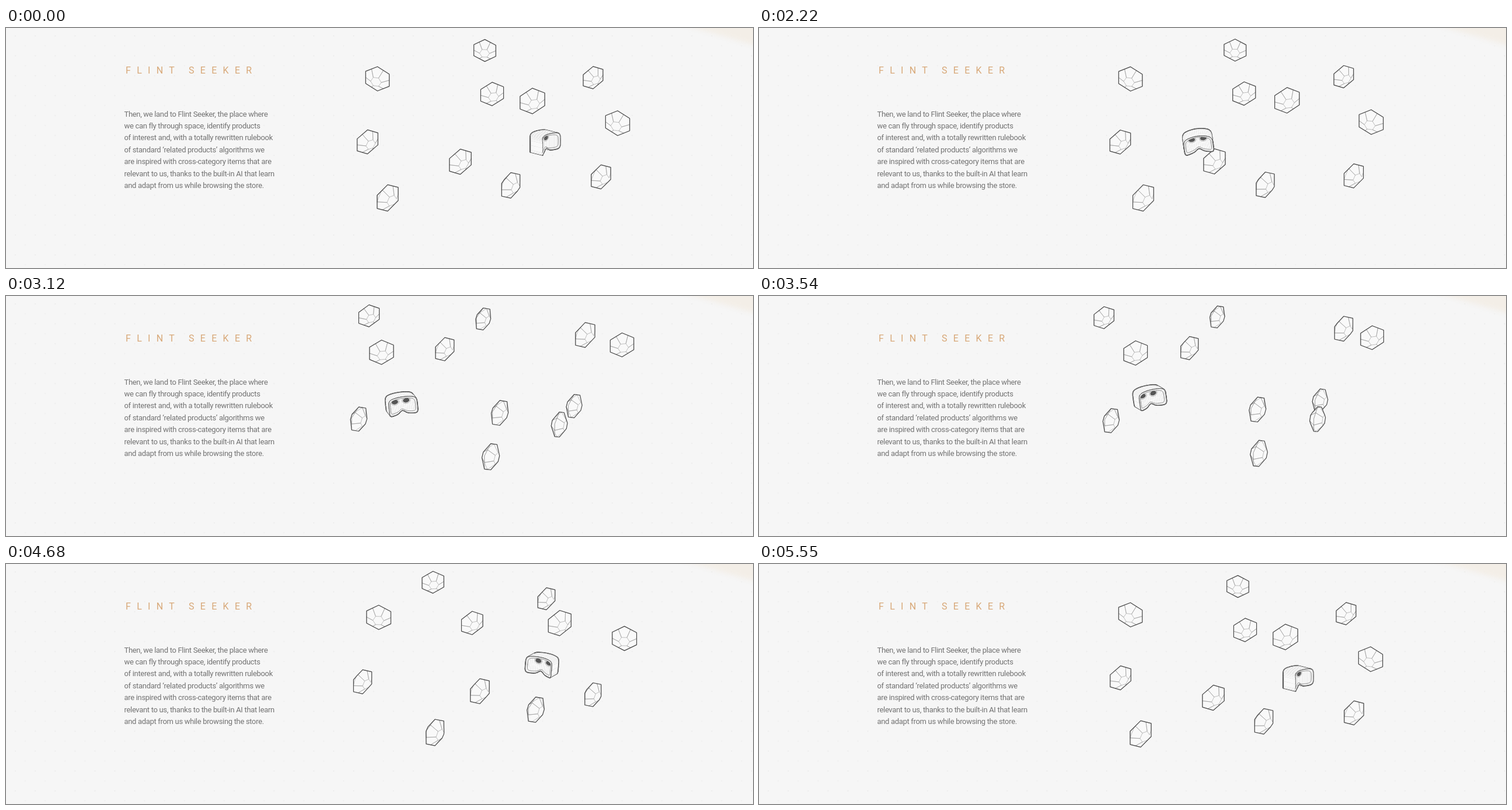
These frames come from a looping animation (1280x411 px, 5580 ms). An HTML page with a canvas:

```html
<!DOCTYPE html>
<html lang="en">
<head>
<meta charset="utf-8">
<title>Flint Seeker</title>
<style>
html, body { margin: 0; width: 100%; height: 100%; overflow: hidden; background: #f6f6f6; }
body { position: relative; font-family: Roboto, "Open Sans", sans-serif; }
.dots {
  position: absolute; inset: 0;
  background:
    radial-gradient(circle, #e6e6e6 .6px, transparent 1.2px) -1px -3.5px / 34.1px 34.1px,
    radial-gradient(circle, #ebebeb .6px, transparent 1.2px) 16px 13.5px / 34.1px 34.1px;
}
.glow { position: absolute; left: 1150px; top: -20px; width: 160px; height: 70px; filter: blur(4px); }
.glow::before {
  content: ""; position: absolute; inset: 0;
  background: #f3eee7; clip-path: polygon(0 11px, 0 0, 100% 0, 100% 57px, 130px 49px);
}
h1 {
  position: absolute; left: 205px; top: 62px; margin: 0;
  font-size: 16px; line-height: 21px; font-weight: 400; letter-spacing: 10.3px;
  color: #d8a878; white-space: nowrap;
}
p {
  position: absolute; left: 202.5px; top: 137.5px; margin: 0;
  font-size: 13px; line-height: 20.45px; letter-spacing: -.32px;
  color: #737373; white-space: nowrap;
}
canvas { position: absolute; left: 0; top: 0; width: 1280px; height: 411px; }
</style>
</head>
<body>
<div class="dots"></div>
<div class="glow"></div>
<h1>FLINT SEEKER</h1>
<p>Then, we land to Flint Seeker, the place where<br>we can fly through space, identify products<br>of interest and, with a totally rewritten rulebook<br>of standard ‘related products’ algorithms we<br>are inspired with cross-category items that are<br>relevant to us, thanks to the built-in AI that learn<br>and adapt from us while browsing the store.</p>
<canvas></canvas>
<script>
const LOOP = 5580, INK = '#4c4c4c', THIN = '#8f8f8f', PAPER = '#f9f9f9';
const canvas = document.querySelector('canvas');
const ctx = canvas.getContext('2d');
const ratio = window.devicePixelRatio || 1;
canvas.width = 1280 * ratio;
canvas.height = 411 * ratio;

// stage x, y at rest, depth towards the viewer, yaw at rest
const gems = [
  [820.5, 38.5, -460, -3],
  [636.5, 87, 7, -14],
  [833, 113, -168, 13],
  [1006, 85, -395, 28],
  [902, 125, 270, 15],
  [1048, 163, 97, -13],
  [619.5, 195, -51, 30],
  [778.5, 229, 187, 30],
  [1019.5, 255, -41, 36],
  [865, 269.5, 244, 44],
  [654, 291, 429, 37]
];
const AXIS = 684, TILT = 30, TURN = 28;

// headset: time, x, y, yaw, pitch, roll
const flight = [
  [0, 921, 196, 53, 19, 0],
  [1320, 924.5, 191.5, 0, 58, 20],
  [2700, 686, 197, 0, 18, 4],
  [3540, 668, 174, 22, 19, 8],
  [4260, 675.5, 176, 285, 19, 5],
  [4680, 920, 173, 335, 19, -5],
  [LOOP, 921, 196, 413, 19, 0]
];

const rad = d => d * Math.PI / 180;
const clamp = v => Math.max(0, Math.min(1, v));
const cubic = u => u < .5 ? 4 * u ** 3 : 1 - 4 * (1 - u) ** 3;

// returns a function from model space to [x, y, depth] on the stage
function view(cx, cy, yaw, pitch, roll = 0) {
  const [sa, ca, sb, cb, sc, cc] = [yaw, pitch, roll]
    .flatMap(d => [Math.sin(rad(d)), Math.cos(rad(d))]);
  return (x, y, z) => {
    const x1 = x * ca + z * sa, z1 = z * ca - x * sa;
    const y1 = y * cb - z1 * sb;
    return [cx + x1 * cc - y1 * sc, cy - x1 * sc - y1 * cc, y * sb + z1 * cb];
  };
}

// positive when the points run anticlockwise on screen
function area(pts) {
  return pts.reduce((sum, p, i) => {
    const q = pts[(i + 1) % pts.length];
    return sum + q[0] * p[1] - p[0] * q[1];
  }, 0);
}

function trace(pts, closed) {
  ctx.beginPath();
  pts.forEach(p => ctx.lineTo(p[0], p[1]));
  if (closed) ctx.closePath();
}

function stroke(pts, closed, color, width) {
  trace(pts, closed);
  ctx.strokeStyle = color;
  ctx.lineWidth = width;
  ctx.stroke();
}

function fill(pts, color) {
  trace(pts, true);
  ctx.fillStyle = color;
  ctx.fill();
}

function hull(pts) {
  const sorted = [...pts].sort((a, b) => a[0] - b[0] || a[1] - b[1]);
  const half = list => {
    const out = [];
    for (const p of list) {
      while (out.length > 1) {
        const [a, b] = out.slice(-2);
        if ((b[0] - a[0]) * (p[1] - a[1]) - (b[1] - a[1]) * (p[0] - a[0]) > 0) break;
        out.pop();
      }
      out.push(p);
    }
    out.pop();
    return out;
  };
  return [...half(sorted), ...half(sorted.reverse())];
}

// the whole field turns about one upright axis; nearer gems are larger
function drawGem([x, y, z, yaw], s) {
  const arm = x - AXIS + .035 * z, turn = TURN * s;
  const from = view(0, 0, 0, TILT)(arm, 0, z);
  const to = view(0, 0, turn, TILT)(arm, 0, z);
  const at = view(x + to[0] - from[0], y + to[1] - from[1], yaw + turn, TILT);
  const r = 24 + .0055 * to[2];
  const ring = (size, height, spin) => Array.from({ length: 6 }, (_, k) => {
    const a = rad(60 * k + spin);
    return at(r * size * Math.cos(a), r * size * Math.sin(a), r * height);
  });
  const corner = ring(1, 0, 30), mid = ring(.866, 0, 0);
  const tables = [ring(.39, .45, 0), ring(.39, -.45, 0)];
  const outline = hull([...corner, ...tables[0], ...tables[1]]);
  fill(outline, PAPER);
  tables.forEach((table, side) => {
    for (let k = 0; k < 6; k++) {
      const n = (k + 1) % 6;
      const facing = area([table[k], mid[k], mid[n], table[n]]) * (side ? -1 : 1);
      if (facing > 0) {
        stroke([mid[k], table[k], table[n], mid[n]], false, THIN, .55);
        stroke([mid[k], corner[k], mid[n]], false, THIN, .55);
      }
    }
  });
  stroke(outline, true, INK, 1.2);
}

const HALF = 25, TALL = 15, DEEP = 26, COLS = 24;
const bend = x => 11 * (x / HALF) ** 2 + 6;
const columns = Array.from({ length: COLS + 1 }, (_, j) => {
  const u = Math.sin(Math.PI / 2 * (2 * j / COLS - 1));
  const y = TALL * (1 - Math.abs(u) ** 9) ** .22;
  return [HALF * u, y, -y + 6 * Math.exp(-((u * 4) ** 2))];
});

function drawHeadset(x, y, yaw, pitch, roll) {
  const at = view(x, y, yaw, pitch, roll);
  const edge = (row, depth) => columns.map(c => at(c[0], c[row], bend(c[0]) - depth));
  const top = edge(1, 0), low = edge(2, 0), farTop = edge(1, DEEP), farLow = edge(2, DEEP);
  const sides = [[top, low], [farLow, farTop], [farTop, top], [low, farLow]];
  const depth = q => q.reduce((sum, p) => sum + p[2], 0);
  const faces = sides
    .flatMap(([a, b]) => columns.slice(1).map((_, j) => [a[j], b[j], b[j + 1], a[j + 1]]))
    .filter(q => area(q) > 0)
    .sort((a, b) => depth(a) - depth(b));
  faces.forEach(q => stroke(q, true, INK, 2.2));
  faces.forEach(q => {
    fill(q, PAPER);
    stroke(q, true, PAPER, .4);
    stroke([q[0], q[3]], false, INK, 1);
    stroke([q[1], q[2]], false, INK, 1);
  });

  const open = Math.cos(rad(yaw)) * Math.cos(rad(pitch));
  if (open < .4) return;
  const inset = row => columns.map(c => at(c[0] * .88, c[row] * .78, bend(c[0]) - 2));
  const rim = [...inset(1), ...inset(2).reverse()];
  stroke(rim, true, '#777', .8);
  ctx.save();
  trace(rim, true);
  ctx.clip();
  ctx.globalAlpha = clamp((open - .53) * 25);
  for (const side of [-10, 10]) {
    const disc = (rx, ry) => Array.from({ length: 24 }, (_, i) => {
      const a = rad(i * 15);
      return at(side + rx * Math.cos(a), 5 + ry * Math.sin(a), -2);
    });
    stroke(disc(7, 5.4), true, THIN, .7);
    fill(disc(5.6, 4), '#555');
  }
  ctx.restore();
}

function headsetAt(t) {
  const i = flight.findIndex(k => k[0] > t);
  const a = flight[i - 1], b = flight[i];
  const u = (t - a[0]) / (b[0] - a[0]), e = u * u * (3 - 2 * u);
  return a.slice(1).map((v, n) => v + (b[n + 1] - v) * e);
}

function draw(t) {
  ctx.setTransform(ratio, 0, 0, ratio, 0, 0);
  ctx.clearRect(0, 0, 1280, 411);
  ctx.lineJoin = ctx.lineCap = 'round';
  const s = cubic(clamp(1 - Math.abs(t - 3708) / 1800));
  gems.forEach(g => drawGem(g, s));
  drawHeadset(...headsetAt(t));
}

const begin = performance.now();
function tick() {
  draw((performance.now() - begin) % LOOP);
  requestAnimationFrame(tick);
}
tick();
</script>
</body>
</html>
```
